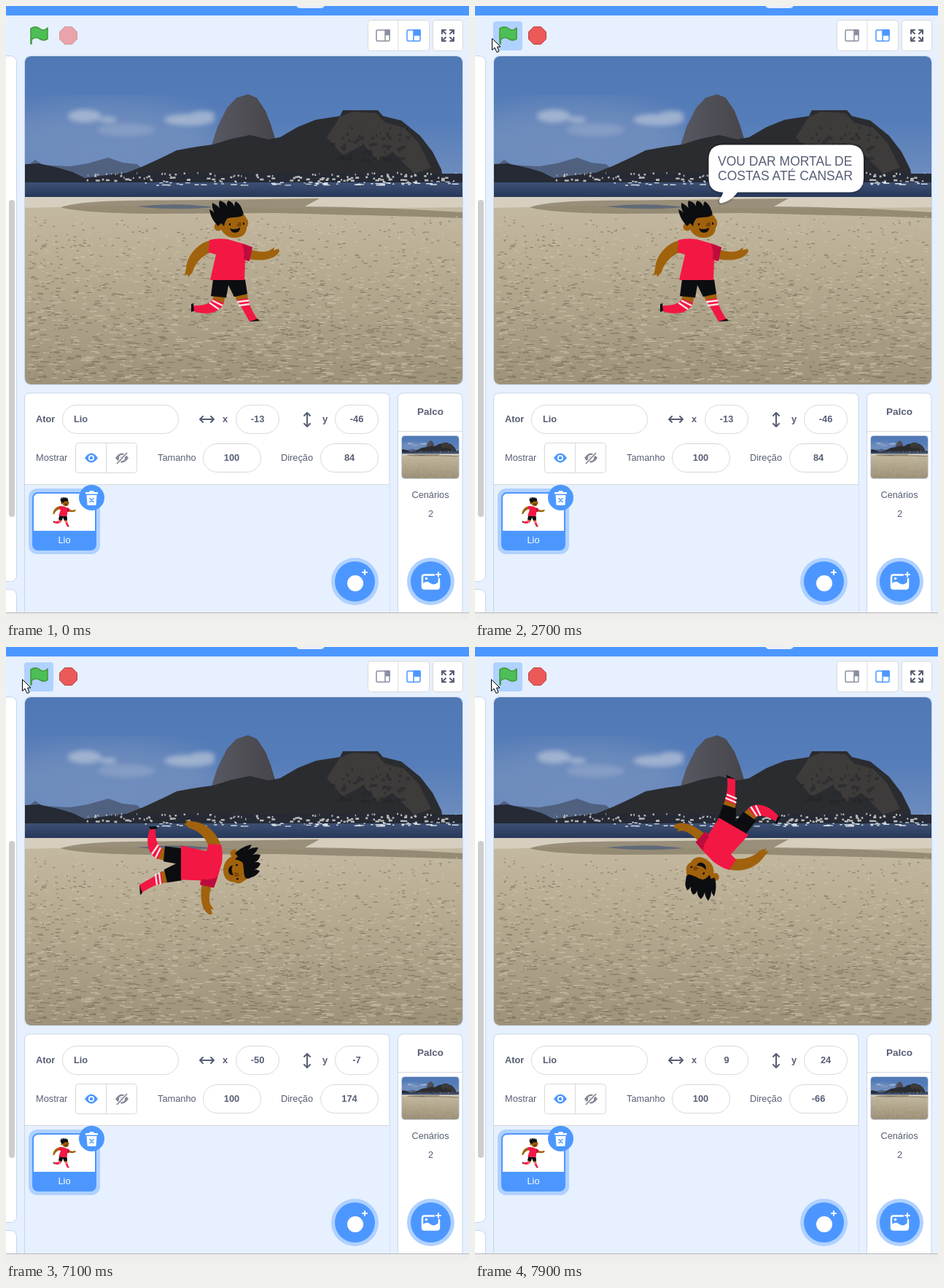
These frames come from a looping animation (635 px wide and 841 px high, 8000 ms). An HTML page:

```html
<!DOCTYPE html>
<html lang="pt">
<head>
<meta charset="utf-8">
<style>
html, body { margin: 0; width: 100%; height: 100%; overflow: hidden; background: #e6f0fe; }
svg { display: block; width: 635px; height: 841px; }
text { font: 12.8px "Liberation Sans", Arial, sans-serif; fill: #575e75; }
.b text { font-weight: bold; }
.mid { text-anchor: middle; }
.box { fill: #fff; stroke: #c9d5e6; }
.pill { fill: #fff; stroke: #d9d9d9; }
.line { fill: none; stroke: #d9d9d9; }
.blue { fill: #4c97ff; }
.halo { fill: #b0d1ff; }
.ico { fill: none; stroke: #575e75; stroke-width: 2; stroke-linecap: round; stroke-linejoin: round; }
.skin { fill: #a0620c; }
.red { fill: #f31744; }
.ink { fill: #0c0d10; }
text.say { font-size: 17.5px; }
</style>
</head>
<body>
<svg viewBox="0 0 635 841">
<defs>
  <linearGradient id="sky" x2="0" y2="1"><stop stop-color="#4f78b5"/><stop offset=".5" stop-color="#557db9"/><stop offset="1" stop-color="#7390be"/></linearGradient>
  <linearGradient id="sand" x2="0" y2="1"><stop stop-color="#c5baa2"/><stop offset=".3" stop-color="#bbb096"/><stop offset="1" stop-color="#9e927a"/></linearGradient>
  <linearGradient id="sea" x2="0" y2="1"><stop stop-color="#3d5073"/><stop offset="1" stop-color="#243557"/></linearGradient>
  <linearGradient id="rock"><stop stop-color="#575963"/><stop offset="1" stop-color="#47454a"/></linearGradient>
  <filter id="soft"><feGaussianBlur stdDeviation="3"/></filter>
  <filter id="haze"><feGaussianBlur stdDeviation="16"/></filter>
  <clipPath id="frame"><rect x="26" y="69" width="600" height="450" rx="8"/></clipPath>
  <clipPath id="photo"><rect x="26" y="69" width="600" height="450" rx="24"/></clipPath>
  <clipPath id="card"><rect x="37" y="668" width="86" height="78" rx="7"/></clipPath>

  <g id="scene">
    <path fill="url(#sky)" d="M26 69h600v180H26z"/>
    <ellipse cx="140" cy="180" rx="150" ry="48" fill="#738fbd" opacity=".8" filter="url(#haze)"/>
    <g fill="#a9b9d3" filter="url(#soft)" opacity=".85">
      <ellipse cx="108" cy="151" rx="23" ry="9"/><ellipse cx="140" cy="156" rx="12" ry="4"/>
      <ellipse cx="252" cy="156" rx="35" ry="8"/><ellipse cx="270" cy="149" rx="17" ry="5"/>
      <ellipse cx="165" cy="170" rx="40" ry="9" opacity=".45"/>
    </g>
    <path fill="#506180" d="M26 222L40 211 50 218 88 220 112 216 140 208 160 215 180 217 200 236H26z"/>
    <path fill="url(#rock)" d="M279 200L290 166 303 140 316 126 332 121 344 126 356 144 363 162 370 185V205z"/>
    <path fill="#2b2c30" d="M165 229L190 219 218 206 234 198 262 193 284 190 310 182 335 177 360 183 376 180 400 166 425 156 458 151 462 143 510 143 517 151 542 157 568 178 585 200 597 224 600 240H160z"/>
    <path fill="#45413f" d="M458 152L475 145 508 147 520 160 546 167 566 188 583 222 560 230 530 200 510 212 490 190 462 205 440 180z" opacity=".75"/>
    <path id="gullies" stroke="#232427" stroke-width="4" opacity=".5"/>
    <path fill="#252a35" d="M26 217L45 216 72 222 92 228 108 236 160 229 300 230 626 230V246H26z"/>
    <path fill="url(#sea)" d="M26 242h600v22H26z"/>
    <path fill="url(#sand)" d="M26 262h600v257H26z"/>
    <path fill="#d6cfbf" d="M26 262H626V276Q420 279 320 276L150 274 26 277z"/>
    <path fill="#8a8069" d="M75 276C110 265 180 267 280 266L430 264 410 275Q520 276 626 283V291C540 288 440 286 370 284L200 285Q100 284 75 276z" opacity=".8"/>
    <path fill="#606a78" d="M180 275Q235 269 286 276 230 281 180 275z"/>
    <path id="lights" stroke="#b8b6b4" stroke-width="2.6"/>
    <path id="boats" stroke="#d5dbe3" stroke-width="1.4"/>
    <path id="dark" stroke="#776c57" stroke-width="1.400" opacity=".6"/>
    <path id="light" stroke="#d2c8b0" stroke-width="1.400" opacity=".6"/>
  </g>

  <g id="runner">
    <path class="skin" d="M283 321C263 324 248 343 247 360L245 370 249 368 250 372 256 365C259 353 268 343 281 338z"/>
    <path class="skin" d="M335 334C348 338 357 338 362 335L368 331 367 335 374 333 375 337 371 342C362 349 346 350 333 347z"/>
    <path class="skin" d="M285 397L301 398 298 409 283 403zM314 396L331 395 332 404 317 406z"/>
    <path class="red" d="M284 402L299 407C293 423 272 425 256 418L258 411C269 411 278 410 284 402zM317 403L332 401C334 413 340 422 345 430L334 433z"/>
    <path fill="none" stroke="#ffe4e6" stroke-width="2.4" d="M283 404L297 411M279 407L292 416M317 406L333 404M319 411L334 409"/>
    <path class="ink" d="M257 408L254 409 254 420 258 418zM334 433L345 429 348 432z"/>
    <path class="ink" d="M284 375H328L331 395 313 399 305 383 302 400 281 398z"/>
    <path class="red" d="M279 321Q290 318 304 320L328 327 338 331 333 350 328 349 327 376H280L288 341 278 338z"/>
    <path fill="#bd0c3e" d="M323 326L338 331 334 350 326 347Q328 334 323 326z"/>
    <circle class="skin" cx="291" cy="303" r="5.5"/>
    <path class="skin" d="M296 288C302 279 324 278 329 290Q335 297 330 304C330 313 323 318 314 318 302 318 295 310 294 302z"/>
    <path class="ink" d="M291 302C285 296 280 288 279 279Q284 281 286 284 282 277 283 270 290 273 293 278 291 272 293 267 301 269 303 275 302 270 305 267 311 269 313 275 313 271 315 268 322 272 324 280 327 285 324 288C316 291 308 289 303 292Q300 296 299 302L295 298z"/>
    <path fill="#7c4708" d="M318 298q4-4 5 1t-7 3z"/>
    <path class="ink" d="M307 305Q314 308 321 304 321 311 314 311 309 311 307 305zM306 298h2v3h-2zM325 297h2v3h-2z"/>
  </g>
</defs>

<path class="blue" d="M0 0H635V13H0z"/><rect x="398" y="-8" width="39" height="11" rx="5" fill="#e9eefc"/>
<rect class="box" x="-20" y="68.500" width="34.500" height="721" rx="8"/>
<rect class="box" x="-20" y="800.500" width="34.500" height="60" rx="8"/>
<rect x="4" y="266" width="8" height="435" rx="4" fill="#cecdce"/>

<rect id="flagBox" x="25" y="21" width="40" height="40" rx="4" class="blue"/>
<path fill="#4cbf56" stroke="#45993d" stroke-width="1.6" stroke-linejoin="round" d="M34 31C40 27 44 29 47 31.500S54 33 57 30V45C53 48 49 47 46 45S39 43 35 46V52H34z"/>
<path id="stop" fill="#ec5959" stroke="#b84848" d="M80.500 28.500h10l7 7v10l-7 7h-10l-7-7v-10z"/>

<rect class="pill" x="496.500" y="19.500" width="84" height="42" rx="4"/><path class="line" d="M538 20V61"/>
<rect class="pill" x="585.500" y="19.500" width="41" height="42" rx="4"/>
<g fill="none" stroke-width="1.5">
  <rect x="508" y="33" width="18" height="15" rx="1.500" stroke="#8b90a0"/><path stroke="#8b90a0" fill="#8b90a0" d="M520 33V48M520 39.500h6V33h-6z"/>
  <rect x="550" y="33" width="18" height="15" rx="1.500" stroke="#4c97ff"/><path class="blue" stroke="#4c97ff" d="M559 33V48M559 40h9V33h-9z"/>
</g>
<path class="ico" d="M603 38l-5-5m0 5v-5h5M609 38l5-5m-5 0h5v5M603 43l-5 5m0-5v5h5M609 43l5 5m-5 0h5v-5"/>

<g clip-path="url(#frame)">
  <use href="#scene"/>
  <use href="#runner" id="actor"/>
  <g id="bubble">
    <path id="balloon" fill="#fff" stroke="#000" stroke-opacity=".15" stroke-width="5" paint-order="stroke"/>
    <text class="say" x="333" y="218.500" id="line1"/><text class="say" x="333" y="238.500" id="line2"/>
  </g>
</g>
<rect x="25.500" y="68.500" width="601" height="451" rx="8" fill="none" stroke="#c9d5e6"/>

<path class="box" d="M25.500 832V539q0-8 8-8H518q8 0 8 8V832"/>
<path fill="#e6f0fe" d="M26 657H526V832H26z"/><path class="line" d="M26 656.500H526"/>
<path class="box" d="M537.500 832V539q0-8 8-8H618q8 0 8 8V832"/><path class="line" d="M538 583.500H626"/>

<rect class="pill" x="77.500" y="547.500" width="159" height="39" rx="19.500"/>
<rect class="pill" x="315.500" y="547.500" width="59" height="39" rx="19.500"/>
<rect class="pill" x="451.500" y="547.500" width="59" height="39" rx="19.500"/>
<rect class="pill" x="270.500" y="600.500" width="79" height="39" rx="19.500"/>
<rect class="pill" x="431.500" y="600.500" width="79" height="39" rx="19.500"/>
<rect class="pill" x="95.500" y="599.500" width="84" height="41" rx="4"/><path class="line" d="M137.500 600V640"/>
<g class="b">
  <text x="41" y="571">Ator</text><text x="93" y="571">Lio</text>
  <text x="297" y="571">x</text><text x="434" y="571">y</text>
  <text class="mid" x="345" y="571" id="posX"/><text class="mid" x="481" y="571" id="posY"/>
  <text class="mid" x="309.500" y="624">100</text><text class="mid" x="471" y="624" id="dir"/>
  <text class="mid" x="582" y="561" style="font-size:13.500px">Palco</text>
</g>
<text x="41" y="624">Mostrar</text><text x="208" y="624">Tamanho</text><text x="377" y="624">Direção</text>
<text class="mid" x="582" y="675">Cenários</text><text class="mid" x="582.500" y="701">2</text>
<path class="ico" d="M267 567h17M270 563l-4 4 4 4M281 563l4 4-4 4M413 559v17M409 562l4-4 4 4M409 573l4 4 4-4"/>
<path class="blue" d="M108 620Q117 607 126 620 117 633 108 620z"/><circle cx="117" cy="620" r="4" fill="#fff"/><circle class="blue" cx="117" cy="620" r="2.300"/>
<g fill="#848898"><path d="M150 620Q159 607 168 620 159 633 150 620z"/><circle cx="159" cy="620" r="4" fill="#fff"/><circle cx="159" cy="620" r="2.300"/><path stroke="#fff" stroke-width="4" d="M153 627l13-14"/><path stroke="#848898" stroke-width="1.800" d="M152 628l14-15"/></g>

<rect class="halo" x="31" y="662" width="98" height="90" rx="12"/>
<g clip-path="url(#card)"><path fill="#fff" d="M36 667h88v80H36z"/><path class="blue" d="M36 720h88v28H36z"/></g>
<rect x="37" y="668" width="86" height="78" rx="7" fill="none" stroke="#4c97ff" stroke-width="2"/>
<use href="#runner" transform="translate(80 694) scale(.24) rotate(5.600) translate(-310 -351)"/>
<text class="mid" x="80" y="737" style="fill:#fff">Lio</text>
<circle class="blue" cx="117.500" cy="674.500" r="17.500"/>
<path fill="#fff" d="M109 667h5l1-2h5l1 2h5v2.500h-17zM110.500 671h14l-1 13q0 1-1 1h-10q-1 0-1-1z"/>
<path class="ico" style="stroke:#4c97ff;stroke-width:1.500" d="M115 675.500l5 5m0-5l-5 5"/>

<g transform="translate(539.600 580.500) scale(.13)"><use href="#scene" clip-path="url(#photo)"/></g>
<rect x="542.500" y="589.500" width="79" height="59" rx="4" fill="none" stroke="#c9d5e6"/>

<circle class="halo" cx="478.500" cy="789.500" r="32.500"/><circle class="blue" cx="478.500" cy="789.500" r="27.500"/>
<circle class="halo" cx="582.500" cy="789.500" r="32.500"/><circle class="blue" cx="582.500" cy="789.500" r="27.500"/>
<circle cx="479" cy="792" r="11" fill="#fff"/>
<path class="ico" style="stroke:#fff;stroke-width:2.500" d="M587 780.500H574q-3 0-3 3v13q0 3 3 3h17q3 0 3-3V786"/>
<path fill="#fff" d="M571 793q6-6 11-1 6 4 12-3v9l-2 2h-19l-2-2z"/><circle cx="576.500" cy="785.500" r="1.800" fill="#fff"/>
<path class="ico" style="stroke:#fff" d="M492 774v6m-3-3h6M593 777v6m-3-3h6"/>
<path fill="#eeedec" d="M0 832H635V841H0z"/><path stroke="#b4b8be" d="M0 832.500H635"/>

<g id="cursor" stroke="#000" stroke-linejoin="round" fill="#fff">
  <path id="arrow" d="M.5.500V16.500L4 13l3 6.500 3-1.300L7.500 12H12z"/>
  <path id="hand" stroke-width="1.200" d="M-2 1Q0-1 2 1V8Q4 6 5 8 7 6.500 8 9 10 8 10 11V16Q9 18 8 22H-2Q-3 18-8 13-9 9-5 11L-2 14zM2 8v4M5 8v4M8 9v4"/>
</g>
</svg>
<script>
const $ = id => document.getElementById(id);
const set = (id, attrs) => { for (const k in attrs) $(id).setAttribute(k, attrs[k]); };
const show = (id, on) => $(id).style.display = on ? "" : "none";

// Seeded texture for the sand, the hill and the shoreline
let seed = 7;
const rnd = () => (seed = seed * 16807 % 2147483647) / 2147483647;
const dashes = (n, x, y, w, h, len, power = 1) => Array.from({ length: n }, () => {
  const depth = rnd() ** power;
  return `M${(x + rnd() * w).toFixed(1)} ${(y + depth * h).toFixed(1)}h${(len * (.3 + rnd()) * (.4 + depth)).toFixed(1)}`;
}).join("");
set("gullies", { d: dashes(60, 445, 165, 105, 50, 6) });
set("lights", { d: dashes(120, 110, 229, 510, 11, 4) });
set("boats", { d: dashes(80, 190, 240, 430, 6, 7) });
set("dark", { d: dashes(1300, 28, 290, 590, 226, 7, .8) });
set("light", { d: dashes(1100, 28, 288, 590, 228, 8, .8) });

const LOOP = 8000, GO = 800, SPEECH = 2700, FLIP = 6400;
const START = { x: -12.6, y: -46.4, dir: 84.4 }, TURN = 15, STRIDE = 10;
const path = [[200, 70, 2], [300, 59, 18], [400, 52, 30], [1100, 49, 36], [1200, 45, 50], [1300, 41, 63],
  [1400, 36, 69], [1500, 32, 66], [1600, 28, 58], [1700, 25, 49], [1800, 23, 44], [7100, 22, 44]];
const flips = [[6400, 1], [6800, 11], [7400, 25], [7500, 25], [7900, 34]];

function stepAt(t) {
  if (t < FLIP) return 0;
  const i = flips.findIndex(f => f[0] >= t), [t1, n1] = flips[i];
  if (t === t1) return n1;
  const [t0, n0] = flips[i - 1];
  return Math.round(n0 + (n1 - n0) * (t - t0) / (t1 - t0));
}

function pose(steps) {
  let { x, y, dir } = START;
  for (let i = 0; i < steps; i++) {
    const a = dir * Math.PI / 180;
    x += STRIDE * Math.sin(a);
    y += STRIDE * Math.cos(a);
    dir -= TURN;
  }
  return { x, y, dir };
}

function drawActor(t) {
  const { x, y, dir } = pose(stepAt(t));
  const place = p => [326 + p.x * 1.25, 294 - p.y * 1.25];
  const [cx, cy] = place(START), [px, py] = place({ x, y });
  set("actor", { transform: `translate(${px} ${py}) rotate(${dir - START.dir}) translate(${-cx} ${-cy})` });
  $("posX").textContent = String(Math.round(x));
  $("posY").textContent = String(Math.round(y));
  $("dir").textContent = Math.round(dir - 360 * Math.ceil((dir - 180) / 360));
}

function drawBubble(t) {
  show("bubble", t >= GO && t < FLIP);
  const long = t >= SPEECH, w = long ? 212.5 : 87.5, top = long ? 190.5 : 210.5;
  set("balloon", { d: `M340 255.500C340 260 335 265 335 267.500Q335 270.500 338 270.500C342 270 354 265 360 255.500
    H${300.5 + w}q20 0 20-20V${top + 20}q0-20-20-20H340.500q-20 0-20 20V235.500q0 20 20 20z` });
  $("line1").textContent = long ? "VOU DAR MORTAL DE" : "";
  $("line2").textContent = long ? "COSTAS ATÉ CANSAR" : "OLÁ";
}

function drawCursor(t) {
  const at = path.filter(p => p[0] <= t).pop();
  const over = !!at && at[1] >= 25 && at[1] < 65 && at[2] >= 21 && at[2] < 61;
  show("cursor", at);
  show("hand", over);
  show("arrow", !over);
  if (at) set("cursor", { transform: `translate(${at[1]} ${at[2]})` });
  const running = t >= GO;
  set("flagBox", { opacity: running ? .35 : over ? .15 : 0 });
  set("stop", { opacity: running ? 1 : .5 });
}

function draw() {
  const t = Math.floor(performance.now() % LOOP / 100) * 100;
  drawActor(t);
  drawBubble(t);
  drawCursor(t);
  requestAnimationFrame(draw);
}
draw();
</script>
</body>
</html>
```
